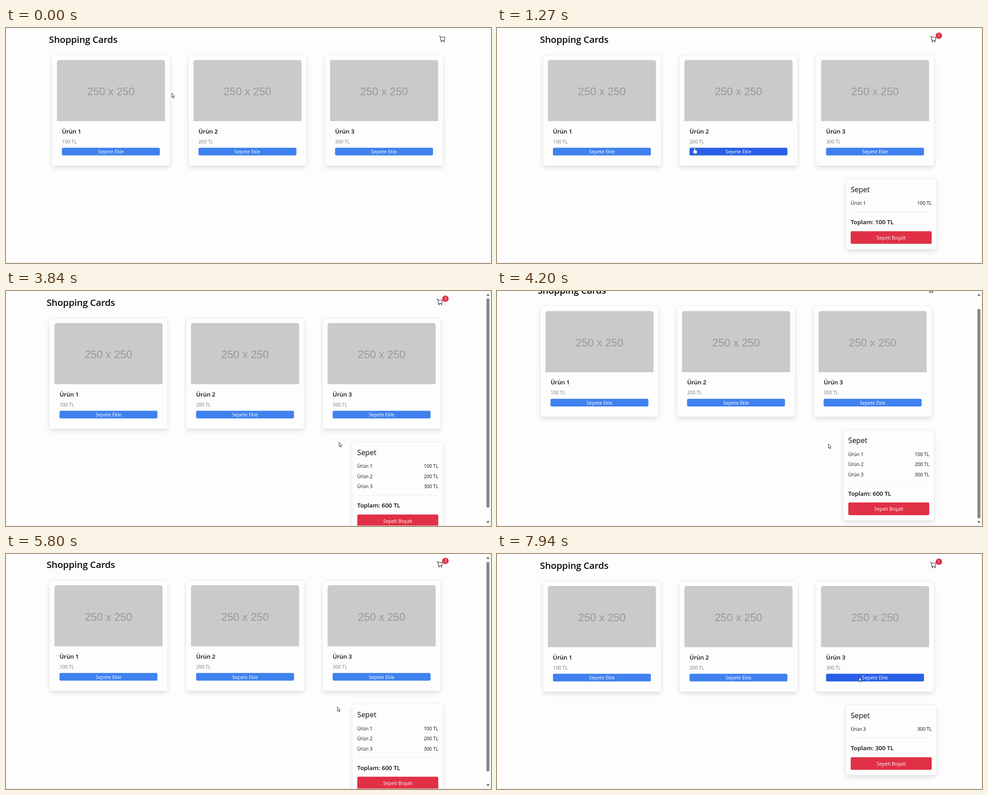
These frames come from a looping animation (1075 px wide and 521 px high, 8 s). An HTML page with a canvas:

```html
<!DOCTYPE html>
<html lang="tr">
<head>
<meta charset="utf-8">
<style>
  html, body { margin: 0; width: 100%; height: 100%; overflow: hidden; background: #fdfdfd; }
  canvas { display: block; width: 1075px; height: 521px; }
</style>
</head>
<body>
<canvas id="stage"></canvas>
<script>
const W = 1075, H = 521, LOOP = 8000;
const canvas = document.getElementById('stage');
const dpr = window.devicePixelRatio || 1;
canvas.width = W * dpr;
canvas.height = H * dpr;
const ctx = canvas.getContext('2d');

const SANS = '"Open Sans", "Noto Sans", sans-serif';
const ARIAL = '"Liberation Sans", Arial, sans-serif';
const BG = '#fdfdfd', BLUE = '#3f81ef', BLUE_HOVER = '#285fe6', RED = '#e03046';
const PRODUCTS = [1, 2, 3], ROW = 22.5, MAX_SCROLL = 26.6;

const cardX = n => 101.5 + (n - 1) * 302.7;
const addButton = n => ({ x: cardX(n) + 22.5, y: 265.5, w: 217, h: 17 });
const clearButton = count => ({ x: 784, y: 450.4 + (count - 1) * ROW, w: 179.5, h: 28.2 });
const price = n => n * 100 + ' TL';

// Smooth 0 → 1 step.
function ramp(t, start, duration) {
  const u = Math.min(1, Math.max(0, (t - start) / duration));
  return u * u * (3 - 2 * u);
}

const clicks = [
  { at: 700, add: 1 }, { at: 1750, add: 2 }, { at: 3450, add: 3 },
  { at: 6720, clear: true }, { at: 7800, add: 3 }
];

const moves = [
  { start: 180, duration: 420, x: 300, y: 271 },
  { start: 830, duration: 440, x: 438, y: 266.5 },
  { start: 1850, duration: 690, x: 774.5, y: 284 },
  { start: 2600, duration: 300, x: 800, y: 273 },
  { start: 3500, duration: 400, x: 734.5, y: 339 },
  { start: 5900, duration: 500, x: 861, y: 476 },
  { start: 6680, duration: 55, x: 861, y: 463.5 },
  { start: 6950, duration: 650, x: 802.5, y: 273 }
];

const basketAt = t => clicks.filter(c => c.at <= t)
  .reduce((items, c) => c.clear ? [] : [...items, c.add], []);

const pointerAt = t => moves.reduce((p, m) => {
  const k = ramp(t, m.start, m.duration);
  return { x: p.x + (m.x - p.x) * k, y: p.y + (m.y - p.y) * k };
}, { x: 367.5, y: 144.5 });

const scrollAt = t => MAX_SCROLL * (ramp(t, 3850, 200) - ramp(t, 4500, 200) + ramp(t, 5770, 200));

function text(str, x, y, size, { color = '#0b0b0b', weight = 400, align = 'left', family = SANS, spacing = 0 } = {}) {
  ctx.font = `${weight} ${size}px ${family}`;
  ctx.letterSpacing = spacing + 'px';
  ctx.textAlign = align;
  ctx.fillStyle = color;
  ctx.fillText(str, x, y);
}

function box(x, y, w, h, radius, fill) {
  ctx.beginPath();
  ctx.roundRect(x, y, w, h, radius);
  ctx.fillStyle = fill;
  ctx.fill();
}

function dot(x, y, r) {
  ctx.beginPath();
  ctx.arc(x, y, r, 0, Math.PI * 2);
}

function polyline(points, close) {
  ctx.beginPath();
  points.forEach(([x, y]) => ctx.lineTo(x, y));
  if (close) ctx.closePath();
}

function panel(x, y, w, h) {
  ctx.save();
  ctx.shadowColor = 'rgba(0,0,0,.13)';
  ctx.shadowBlur = 11 * dpr;
  ctx.shadowOffsetY = 5 * dpr;
  box(x + 1, y + 1, w - 2, h - 2, 5, BG);
  ctx.restore();
  box(x, y, w, h, 5, BG);
  ctx.strokeStyle = '#e8e9ee';
  ctx.lineWidth = 0.8;
  ctx.stroke();
}

function button({ x, y, w, h }, label, fill) {
  box(x, y, w, h, 3, fill);
  text(label, x + w / 2, y + h / 2 + 4.3, 10.7, { color: '#fff', align: 'center' });
}

function productCard(n, hovered) {
  const x = cardX(n);
  panel(x, 59.5, 262.3, 246);
  box(x + 11.3, 71, 239.6, 135.5, [5, 5, 0, 0], '#cacaca');
  text('250 x 250', x + 131, 149.3, 24, { color: '#999', align: 'center', family: ARIAL });
  text('Ürün ' + n, x + 22.6, 233.5, 13, { weight: 600 });
  text(price(n), x + 22.6, 256, 10.6, { color: '#777' });
  button(addButton(n), 'Sepete Ekle', hovered ? BLUE_HOVER : BLUE);
}

function header(count) {
  text('Shopping Cards', 95.3, 33, 20.6, { weight: 600, spacing: -0.2 });
  ctx.strokeStyle = '#333';
  ctx.lineWidth = 1.1;
  ctx.lineJoin = ctx.lineCap = 'round';
  polyline([[960.5, 18.4], [962.4, 18.4], [964, 27.6], [971.8, 27.6], [972.9, 20.3], [963, 20.3]]);
  ctx.stroke();
  for (const x of [965, 970.7]) {
    dot(x, 30, 0.8);
    ctx.stroke();
  }
  if (!count) return;
  dot(979.4, 17, 7.1);
  ctx.fillStyle = RED;
  ctx.fill();
  text(count, 979.4, 20, 8.3, { color: '#fff', align: 'center' });
}

function basketPanel(items) {
  const extra = (items.length - 1) * ROW;
  panel(772.5, 334.3, 202, 156.2 + extra);
  text('Sepet', 784, 364, 16);
  items.forEach((n, i) => {
    const y = 392.4 + i * ROW;
    text('Ürün ' + n, 784, y, 10.5);
    text(price(n), 963.6, y, 10.6, { align: 'right' });
  });
  box(784, 407.5 + extra, 179.5, 0.8, 0, '#e6e7ea');
  const total = items.reduce((sum, n) => sum + n, 0);
  text('Toplam: ' + price(total), 784, 435.3 + extra, 13.3, { weight: 600 });
  button(clearButton(items.length), 'Sepeti Boşalt', RED);
}

function scrollbar(pageHeight, scroll) {
  const ratio = 488 / pageHeight;
  box(1065, 16 + scroll * ratio, 6.5, H * ratio, 3.2, '#858585');
  ctx.fillStyle = '#7d7d7d';
  for (const [base, tip] of [[11, 5.5], [510, 515.5]]) {
    polyline([[1064.5, base], [1068.3, tip], [1072, base]], true);
    ctx.fill();
  }
}

function pointer({ x, y }, hand) {
  ctx.save();
  ctx.translate(x, y);
  ctx.lineJoin = 'round';
  ctx.lineWidth = 0.9;
  ctx.strokeStyle = '#222';
  ctx.fillStyle = '#fff';
  if (hand) {
    ctx.beginPath();
    ctx.roundRect(-1, -0.5, 2, 8, 1);
    ctx.roundRect(-2.8, 4.5, 8, 7.5, 2.5);
    ctx.stroke();
    ctx.fill();
  } else {
    polyline([[0, 0], [0, 9.4], [2, 7.5], [3.5, 10.8], [5, 10.2], [3.6, 7], [6.4, 6.8]], true);
    ctx.fill();
    ctx.stroke();
  }
  ctx.restore();
}

function windowEdge() {
  ctx.beginPath();
  ctx.roundRect(-10, -0.5, W + 9.5, H, 6);
  ctx.strokeStyle = '#e2e2e2';
  ctx.lineWidth = 1;
  ctx.stroke();
}

function draw(t) {
  const items = basketAt(t), count = items.length;
  const overflowing = count > 1;
  const scroll = count === 3 ? scrollAt(t) : 0;
  const shift = overflowing ? -5.4 : 0;
  const mouse = pointerAt(t);
  const isOver = ({ x, y, w, h }) => {
    const dx = mouse.x - shift - x, dy = mouse.y + scroll - y;
    return dx >= 0 && dx <= w && dy >= 0 && dy <= h;
  };
  const hovered = PRODUCTS.find(n => isOver(addButton(n)));
  const overClear = count > 0 && isOver(clearButton(count));
  const justClicked = clicks.some(c => t >= c.at && t < c.at + 200);

  ctx.setTransform(dpr, 0, 0, dpr, 0, 0);
  ctx.fillStyle = BG;
  ctx.fillRect(0, 0, W, H);
  ctx.save();
  ctx.translate(shift, -scroll);
  header(count);
  PRODUCTS.forEach(n => productCard(n, n === hovered));
  if (count) basketPanel(items);
  ctx.restore();
  if (overflowing) scrollbar(502.5 + count * 15, scroll);
  windowEdge();
  pointer(mouse, (hovered || overClear) && !justClicked);
}

const start = performance.now();
function tick() {
  draw((performance.now() - start) % LOOP);
  requestAnimationFrame(tick);
}
tick();
</script>
</body>
</html>
```
